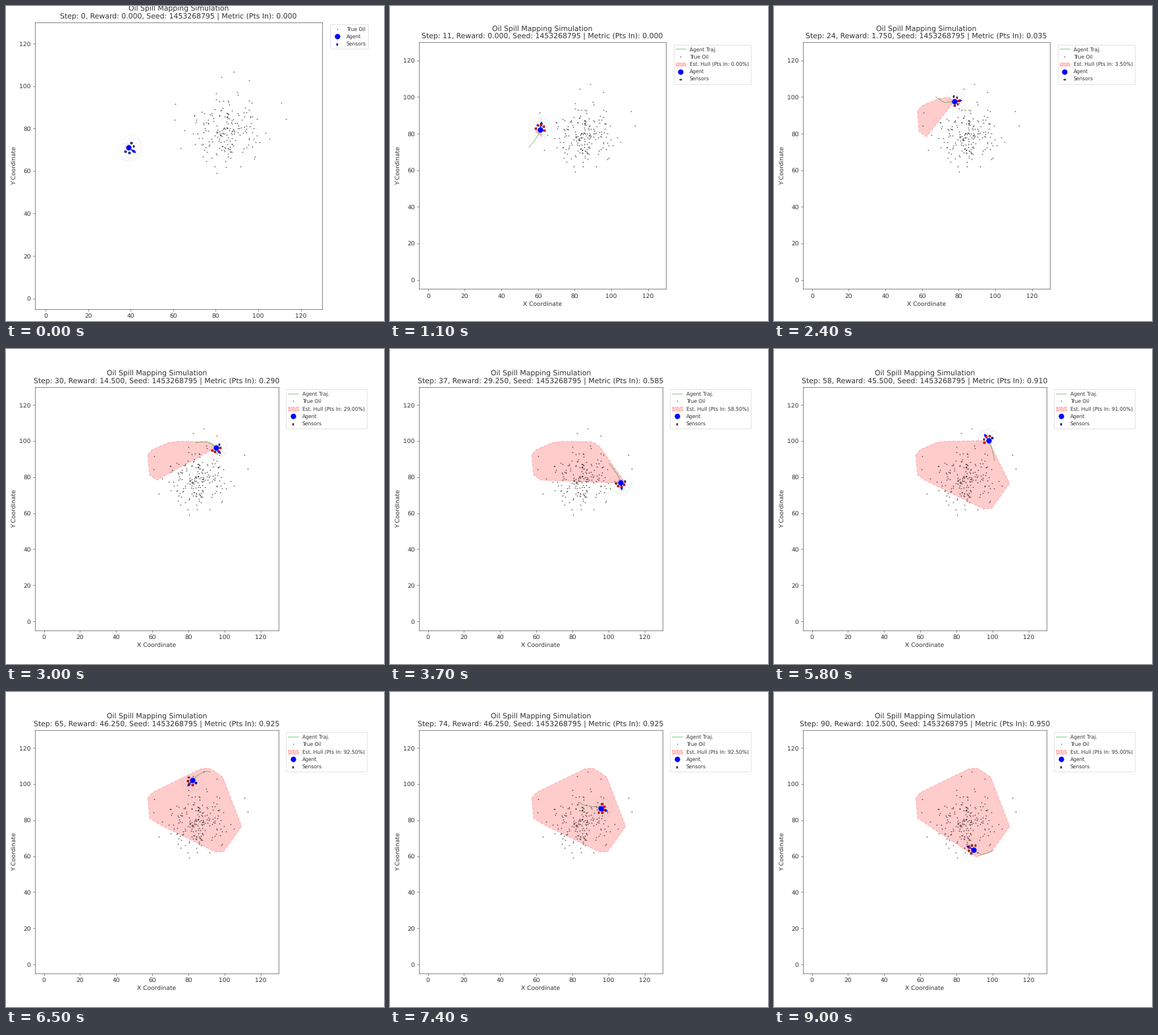
Recreate the animation shown at these times as a matplotlib script. Size 574 by 479 pixels, loop 9.1 s.

```python
import matplotlib.pyplot as plt
import numpy as np
from matplotlib.animation import FuncAnimation
from matplotlib.patches import Circle, Polygon
from matplotlib.path import Path

W, H, DPI = 574, 479, 64
STEPS = 91
FIRST_HULL = 11
SENSOR_DIST, SENSOR_RANGE = 2.5, 4
REACH = 3.5
TRAIL = 4
INK = "0.2"
plt.rcParams.update({
    "font.family": "DejaVu Sans", "font.size": 10.25, "text.hinting": "none",
    "text.color": INK, "axes.labelcolor": INK, "axes.edgecolor": "0.35",
    "xtick.color": "0.35", "ytick.color": "0.35",
    "xtick.labelcolor": INK, "ytick.labelcolor": INK,
    "legend.edgecolor": "0.85",
})

# Agent waypoints: step, x, y
ROUTE = np.array([
    (0, 39, 71), (3.2, 46, 66), (7, 55, 72.5), (11, 61.2, 82.3),
    (14.2, 60.5, 91.5), (17.4, 62.2, 100.2), (20, 67.5, 100.2),
    (22, 72, 97.1), (24, 77.6, 97.7), (28.6, 92, 99), (33, 100.5, 87.5),
    (37, 106.7, 77), (42, 102, 64), (45.7, 93, 66), (54, 101, 89),
    (58, 97.7, 100.2), (61.5, 91, 107), (65.9, 81, 100), (70, 83.9, 89.6),
    (74, 95.5, 86.5), (79, 108, 79), (86, 99.9, 63), (88, 94, 60.9),
    (90, 89.3, 63.6),
])

# Corners of the full hull, in order around it
CORNERS = np.array([
    (62.5, 78.3), (58.5, 81.1), (57.5, 92.3), (60, 95.2), (69, 99.1),
    (87, 108.4), (91, 108.8), (94.5, 107), (99, 103.7), (109.4, 76.5),
    (99.5, 62.6), (91, 59.5),
])
# Detections that matter only while the hull grows
EARLY = np.array([(74.7, 99.8), (95, 97), (95, 62.3)])

# Share of oil inside the hull: step, value
METRIC = np.array([(11, 0), (24, .035), (37, .585), (45, .905), (58, .91),
                   (62, .925), (87, .925), (90, .95)])


def make_oil():
    """A round cloud of 188 drops and a few stray ones."""
    z = np.random.default_rng(7).normal(size=(400, 2))
    cloud = z[np.hypot(*z.T) < 2.1][:188] * (9, 8.8) + (85.8, 79.5)
    strays = [(88.5, 106.8), (82.6, 104.3), (95.6, 102.8), (110.8, 92.2),
              (112.9, 84.5), (60.6, 84.2), (60.9, 91.6), (63.4, 70.9),
              (65.3, 79.2), (80.4, 59.1), (105.2, 75.2), (80.1, 96.6)]
    return np.vstack([cloud, strays])


def follow_route(steps):
    """Hermite spline through the waypoints: positions and headings."""
    t, p = ROUTE[:, 0], ROUTE[:, 1:]
    m = np.gradient(p, t, axis=0)
    k = np.clip(np.searchsorted(t, steps, side="right") - 1, 0, len(t) - 2)
    h = (t[k + 1] - t[k])[:, None]
    u = (steps - t[k])[:, None] / h
    pos = ((2 * u**3 - 3 * u**2 + 1) * p[k] + (u**3 - 2 * u**2 + u) * h * m[k]
           + (3 * u**2 - 2 * u**3) * p[k + 1] + (u**3 - u**2) * h * m[k + 1])
    vel = ((6 * u**2 - 6 * u) * (p[k] - p[k + 1]) / h
           + (3 * u**2 - 4 * u + 1) * m[k] + (3 * u**2 - 2 * u) * m[k + 1])
    return pos, np.arctan2(vel[:, 1], vel[:, 0])


def convex_hull(points):
    pts = sorted(map(tuple, points))

    def chain(seq):
        out = []
        for x, y in seq:
            while len(out) > 1:
                (x0, y0), (x1, y1) = out[-2:]
                if (x1 - x0) * (y - y0) - (y1 - y0) * (x - x0) > 0:
                    break
                out.pop()
            out.append((x, y))
        return out[:-1]

    return chain(pts) + chain(pts[::-1])


OIL = make_oil()
POS, HEADING = follow_route(np.arange(STEPS))
FAN = np.radians([-90, -45, 0, 45, 90])

# A detection counts from the first step the agent comes within reach
HITS = np.vstack([CORNERS, EARLY])
FOUND = (np.linalg.norm(POS[:, None] - HITS, axis=2) < REACH).argmax(axis=0)
INSIDE = Path(CORNERS).contains_points(POS)


def hull_at(step):
    visited = POS[:step + 1][INSIDE[:step + 1]]
    return convex_hull(np.vstack([HITS[FOUND <= step], visited]))


def metric_at(step):
    return round(np.interp(step, *METRIC.T) * 200) / 200


def axes_size(step, metric):
    """The plot shrinks as the legend gets wider."""
    if step == 0:
        return 436
    if step < FIRST_HULL:
        return 425
    return 375.5 if metric < .1 else 370.3


fig = plt.figure(figsize=(W / DPI, H / DPI), dpi=DPI)
ax = fig.add_axes([0, 0, 1, 1])


def draw(step):
    ax.clear()
    metric = metric_at(step)
    size = axes_size(step, metric)
    ax.set_position([43.9 / W, (H - 242.7 - size / 2) / H, size / W, size / H])
    ax.set(xlim=(-5, 130), ylim=(-5, 130), xlabel="X Coordinate",
           ylabel="Y Coordinate", xticks=range(0, 121, 20),
           yticks=range(0, 121, 20))

    if step:
        trail = POS[max(0, step - TRAIL):step + 1]
        ax.plot(*trail.T, "g-", lw=1, alpha=.5, label="Agent Traj.")
    ax.plot(*OIL.T, "k.", ms=2, alpha=.5, label="True Oil")

    if step >= FIRST_HULL:
        ax.add_patch(Polygon(hull_at(step), fc="red", ec="red", ls="--",
                             lw=1.5, alpha=.2,
                             label=f"Est. Hull (Pts In: {metric:.2%})"))

    (x, y), a = POS[step], HEADING[step]
    ax.plot(x, y, "bo", ms=8.2, zorder=3, label="Agent")
    ax.arrow(x, y, 3 * np.cos(a), 3 * np.sin(a), head_width=1.2,
             head_length=1.2, fc="blue", ec="blue", zorder=3)

    sensors = POS[step] + SENSOR_DIST * np.c_[np.cos(a + FAN), np.sin(a + FAN)]
    gaps = np.linalg.norm(sensors[:, None] - OIL, axis=2).min(axis=1)
    colors = ["red" if g < SENSOR_RANGE else "blue" for g in gaps]
    ax.scatter(*sensors.T, c=colors, s=10.5, marker="s", edgecolors="black",
               linewidths=.5, zorder=4, label="Sensors")
    for s in sensors:
        ax.add_patch(Circle(s, SENSOR_RANGE, fill=False, ec="gray", ls=":",
                            lw=.5, alpha=.5))

    reward = 50 * metric + (55 if step == STEPS - 1 else 0)
    ax.set_title("Oil Spill Mapping Simulation\n"
                 f"Step: {step}, Reward: {reward:.3f}, Seed: 1453268795 | "
                 f"Metric (Pts In): {metric:.3f}")
    ax.legend(loc="upper left", bbox_to_anchor=(1.02, 1), fontsize="small")


anim = FuncAnimation(fig, draw, frames=STEPS, init_func=lambda: draw(0),
                     interval=100, repeat=True)
plt.show()
```
